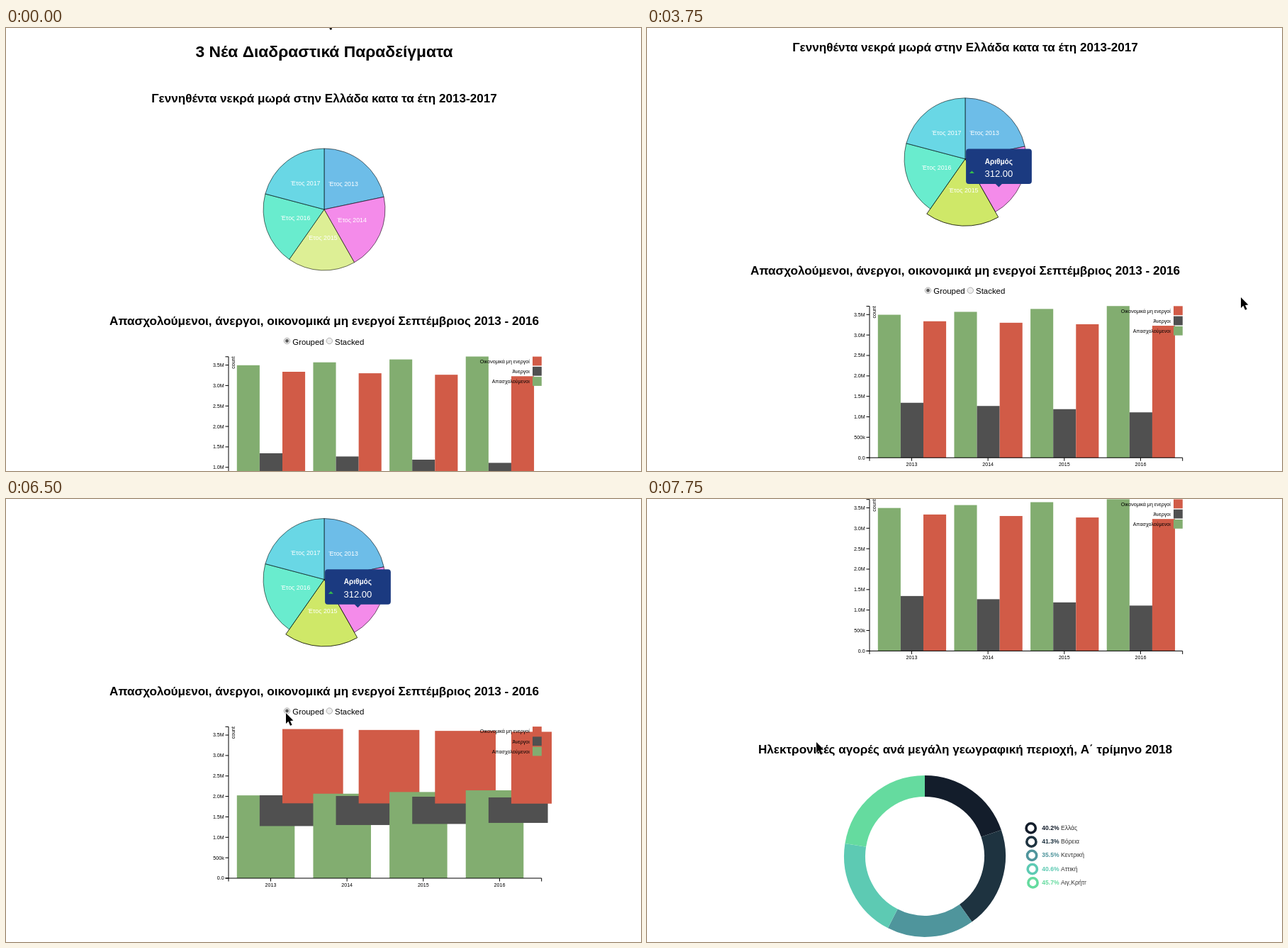
An HTML page with a canvas that plays this animation: 896 px wide and 625 px high, repeating every 8000 ms.

```html
<!DOCTYPE html>
<html lang="el">
<head>
<meta charset="utf-8">
<style>
  html, body { margin: 0; width: 100%; height: 100%; overflow: hidden; background: #fff; }
  canvas { display: block; }
</style>
</head>
<body>
<canvas id="stage" width="896" height="625"></canvas>
<script>
const ctx = document.getElementById('stage').getContext('2d');
const LOOP = 8000, STEP = 250, TAU = Math.PI * 2;
const PIE = { x: 449, y: 256, r: 86, grow: 8.5 };
const BASE = 677.5, AXIS_H = 214, PER_MILLION = 57.7;
const BAR_W = 32.1, GROUP_W = 107.65;
const STACK_AT = 5200, GROUP_AT = 6307;
const NOTCH = 71.25; // one wheel notch

const slices = [
  ['2013', 377, '#30a1de'], ['2014', 349, '#ef5be1'], ['2015', 312, '#cfe868'],
  ['2016', 337, '#2ae4ba'], ['2017', 363, '#2ac7da']
];
// label, colour, first bar height, change per year
const series = [
  ['Απασχολούμενοι', '#82ad70', 201.7, 4.1],
  ['Άνεργοι', '#505050', 77.5, -4.5],
  ['Οικονομικά μη ενεργοί', '#d15b47', 192.5, -2.1]
];
const regions = [
  [40.2, 'Ελλάς', '#131d2b'], [41.3, 'Βόρεια', '#1e3340'], [35.5, 'Κεντρική', '#4f959c'],
  [40.6, 'Αττική', '#5dcab3'], [45.7, 'Αιγ,Κρήτη', '#65db9f']
];

// Hovers are [time, slice]; moves are [start, duration, ...goal]
const hovers = [[900, 0], [1330, 4], [1510, 3], [2515, 2]];
const cursorMoves = [
  [0, 500, 512, 220], [750, 750, 404, 247], [1500, 500, 412, 290], [2000, 750, 512, 290],
  [2750, 500, 661, 315], [3250, 250, 838, 380], [4000, 1000, 457, 300],
  [5750, 500, 395, 302], [6500, 500, 251, 343], [7250, 500, 239, 343]
];
const scrollMoves = [[3500, 500, 2 * NOTCH], [7000, 250, 5.5 * NOTCH], [7250, 500, 6.5 * NOTCH]];

const mix = (a, b, f) => a + (b - a) * f;

function ease(f) {
  f = Math.min(1, Math.max(0, f));
  return f < .5 ? 4 * f ** 3 : 1 - 4 * (1 - f) ** 3;
}

function follow(start, moves, t) {
  return moves.reduce((pos, [from, time, ...goal]) =>
    pos.map((v, i) => mix(v, goal[i], ease((t - from) / time))), start);
}

// Turns values into [start, end] angles clockwise from the top
function arcs(values) {
  const total = values.reduce((a, b) => a + b);
  let angle = -TAU / 4;
  return values.map(v => [angle, angle += v / total * TAU]);
}

const pieArcs = arcs(slices.map(s => s[1]));
const ringArcs = arcs(regions.map(r => r[0]));

function centroid(i, r) {
  const mid = (pieArcs[i][0] + pieArcs[i][1]) / 2;
  return [PIE.x + r / 2 * Math.cos(mid), PIE.y + r / 2 * Math.sin(mid)];
}

function text(s, x, y, size, color = '#000', align = 'center', weight = '') {
  ctx.font = `${weight} ${size}px "Liberation Sans", Arial, sans-serif`;
  ctx.textAlign = align;
  ctx.fillStyle = color;
  ctx.fillText(s, x, y);
}

function rect(x, y, w, h, color) {
  ctx.fillStyle = color;
  ctx.fillRect(x, y, w, h);
}

function path(points, close) {
  ctx.beginPath();
  points.forEach(([x, y]) => ctx.lineTo(x, y));
  if (close) ctx.closePath();
}

function line(...points) {
  path(points);
  ctx.stroke();
}

function disc(x, y, r) {
  ctx.beginPath();
  ctx.arc(x, y, r, 0, TAU);
}

function clipTo(x, y, w, h) {
  ctx.save();
  ctx.beginPath();
  ctx.rect(x, y, w, h);
  ctx.clip();
}

function hoverAmount(slice, t) {
  const n = hovers.findIndex(h => h[1] === slice);
  if (n < 0) return 0;
  const leave = n + 1 < hovers.length ? hovers[n + 1][0] : Infinity;
  return ease((t - hovers[n][0]) / 315) - ease((t - leave) / 315);
}

function drawPie(t) {
  slices.forEach(([year, , color], i) => {
    const hover = hoverAmount(i, t), r = PIE.r + PIE.grow * hover;
    ctx.beginPath();
    ctx.moveTo(PIE.x, PIE.y);
    ctx.arc(PIE.x, PIE.y, r, ...pieArcs[i]);
    ctx.closePath();
    ctx.globalAlpha = .7 + .3 * hover;
    ctx.fillStyle = color;
    ctx.fill();
    ctx.strokeStyle = '#000';
    ctx.lineWidth = .8;
    ctx.stroke();
    ctx.globalAlpha = 1;
    text('Έτος ' + year, ...centroid(i, r), 8.8, '#fff');
  });
}

function drawTip(t) {
  const seen = hovers.filter(h => h[0] <= t);
  if (!seen.length) return;
  const goals = seen.map(([from, i]) => [from, 360, ...centroid(i, PIE.r)]);
  const [cx, cy] = follow(goals[0].slice(2), goals, t);
  const x = cx + 49.4, y = cy - 57.3;
  const value = slices[seen[seen.length - 1][1]][1];
  ctx.fillStyle = '#1b3a80';
  ctx.beginPath();
  ctx.roundRect(x - 46.3, y, 92.8, 49.7, 4);
  ctx.fill();
  path([[x - 5, y + 49], [x + 5, y + 49], [x, y + 54]]);
  ctx.fill();
  ctx.fillStyle = '#35c04a';
  path([[x - 41.5, y + 34.5], [x - 34.5, y + 34.5], [x - 38, y + 31]]);
  ctx.fill();
  text('Αριθμός', x, y + 21.3, 10, '#fff', 'center', 'bold');
  text(value.toFixed(2), x, y + 40, 13, '#fff');
}

function drawRadio(x, label, on) {
  disc(x, 441.5, 4.2);
  ctx.fillStyle = '#eee';
  ctx.fill();
  ctx.strokeStyle = '#a5a5a5';
  ctx.lineWidth = .9;
  ctx.stroke();
  if (on) {
    disc(x, 441.5, 2.4);
    ctx.fillStyle = '#5a5a5a';
    ctx.fill();
  }
  text(label, x + 7.8, 446.5, 11.4, '#000', 'left');
}

function drawAxes(inc, unit) {
  const top = BASE - AXIS_H, left = 314, right = 755.7, tick = 4.5;
  ctx.strokeStyle = '#000';
  ctx.lineWidth = 1;
  line([left - tick, top + .3], [left, top + .3], [left, BASE], [left - tick, BASE]);
  line([left, BASE + tick], [left, BASE], [right, BASE], [right, BASE + tick]);
  for (let v = 0; v * unit <= AXIS_H; v += inc) {
    const y = BASE - v * unit;
    line([left - tick, y], [left, y]);
    text(v === .5 ? '500k' : v.toFixed(1) + (v ? 'M' : ''), 307.7, y + 2.4, 7.1, '#000', 'right');
  }
  for (let g = 0; g < 4; g++) {
    const x = 373.5 + GROUP_W * g;
    line([x, BASE], [x, BASE + tick]);
    text(2013 + g, x, BASE + 11.8, 7.1);
  }
  ctx.save();
  ctx.translate(323.3, top);
  ctx.rotate(-TAU / 4);
  text('count', 0, 0, 7.1, '#000', 'right');
  ctx.restore();
}

function drawBars(t) {
  const stacked = t >= STACK_AT && t < GROUP_AT;
  const shrink = AXIS_H / series.reduce((sum, s) => sum + s[2], 0);
  drawRadio(396.5, 'Grouped', !stacked);
  drawRadio(456.3, 'Stacked', stacked);
  clipTo(280, 450, 490, 260);
  for (let g = 0; g < 4; g++) {
    let below = 0;
    series.forEach(([, color, first, change], i) => {
      const wait = 10 * i, h = first + change * g;
      const p = ease((t - STACK_AT - wait) / 500) - ease((t - GROUP_AT - wait) / 500);
      const height = mix(h, h * shrink, p);
      const x = 325.8 + GROUP_W * g + (stacked ? 0 : BAR_W * i);
      rect(x, BASE - p * shrink * below - height, mix(BAR_W, 3 * BAR_W, p), height, color);
      below += h;
    });
  }
  drawAxes(stacked ? 1 : .5, PER_MILLION * (stacked ? shrink : 1));
  series.forEach(([label, color], i) => {
    const y = 463.6 + 14.25 * (2 - i);
    rect(743, y, 12.8, 12.8, color);
    text(label, 738.8, y + 9.2, 7.1, '#000', 'right');
  });
  ctx.restore();
}

function drawDonut() {
  clipTo(270, 840, 350, 260);
  regions.forEach(([value, name, color], i) => {
    const y = 927.5 + 19.25 * i;
    ctx.strokeStyle = color;
    ctx.lineWidth = 30;
    ctx.beginPath();
    ctx.arc(392, 967, 99, ...ringArcs[i]);
    ctx.stroke();
    ctx.lineWidth = 3.6;
    disc(541.7 + .7 * i, y, 6.6);
    ctx.stroke();
    text(value.toFixed(1) + '%', 557.3, y + 2.6, 8.55, color, 'left', 'bold');
    text(name, 584, y + 2.6, 8.55, '#333', 'left');
  });
  ctx.restore();
}

function drawCursor(t) {
  const overText = t > 2600 && t < 2900;
  ctx.save();
  ctx.translate(...follow([451.5, -15], cursorMoves, t));
  ctx.lineJoin = 'round';
  if (overText) {
    for (const [color, width] of [['#fff', 3], ['#000', 1.2]]) {
      ctx.strokeStyle = color;
      ctx.lineWidth = width;
      line([-3, -6.5], [4, -6.5]);
      line([.5, -6.5], [.5, 6.5]);
      line([-3, 6.5], [4, 6.5]);
    }
  } else {
    path([[0, 0], [0, 15], [3.4, 11.8], [6, 17.8], [8.6, 16.7], [6, 10.9], [10.4, 10.6]], true);
    ctx.strokeStyle = '#fff';
    ctx.lineWidth = 1.2;
    ctx.stroke();
    ctx.fillStyle = '#000';
    ctx.fill();
  }
  ctx.restore();
}

function draw(now) {
  const t = Math.floor(now % LOOP / STEP) * STEP;
  const heading = (s, y, size = 17.1) => text(s, 449, y, size, '#000', 'center', 'bold');
  rect(0, 0, 896, 625, '#fff');
  ctx.save();
  ctx.translate(0, -follow([0], scrollMoves, t)[0]);
  heading('3 Νέα Διαδραστικά Παραδείγματα', 41, 22.8);
  heading('Γεννηθέντα νεκρά μωρά στην Ελλάδα κατα τα έτη 2013-2017', 104.5);
  heading('Απασχολούμενοι, άνεργοι, οικονομικά μη ενεργοί Σεπτέμβριος 2013 - 2016', 419);
  heading('Ηλεκτρονικές αγορές ανά μεγάλη γεωγραφική περιοχή, Α΄ τρίμηνο 2018', 822.5);
  drawPie(t);
  drawBars(t);
  drawDonut();
  drawTip(t);
  ctx.restore();
  drawCursor(t);
  requestAnimationFrame(draw);
}
requestAnimationFrame(draw);
</script>
</body>
</html>
```
